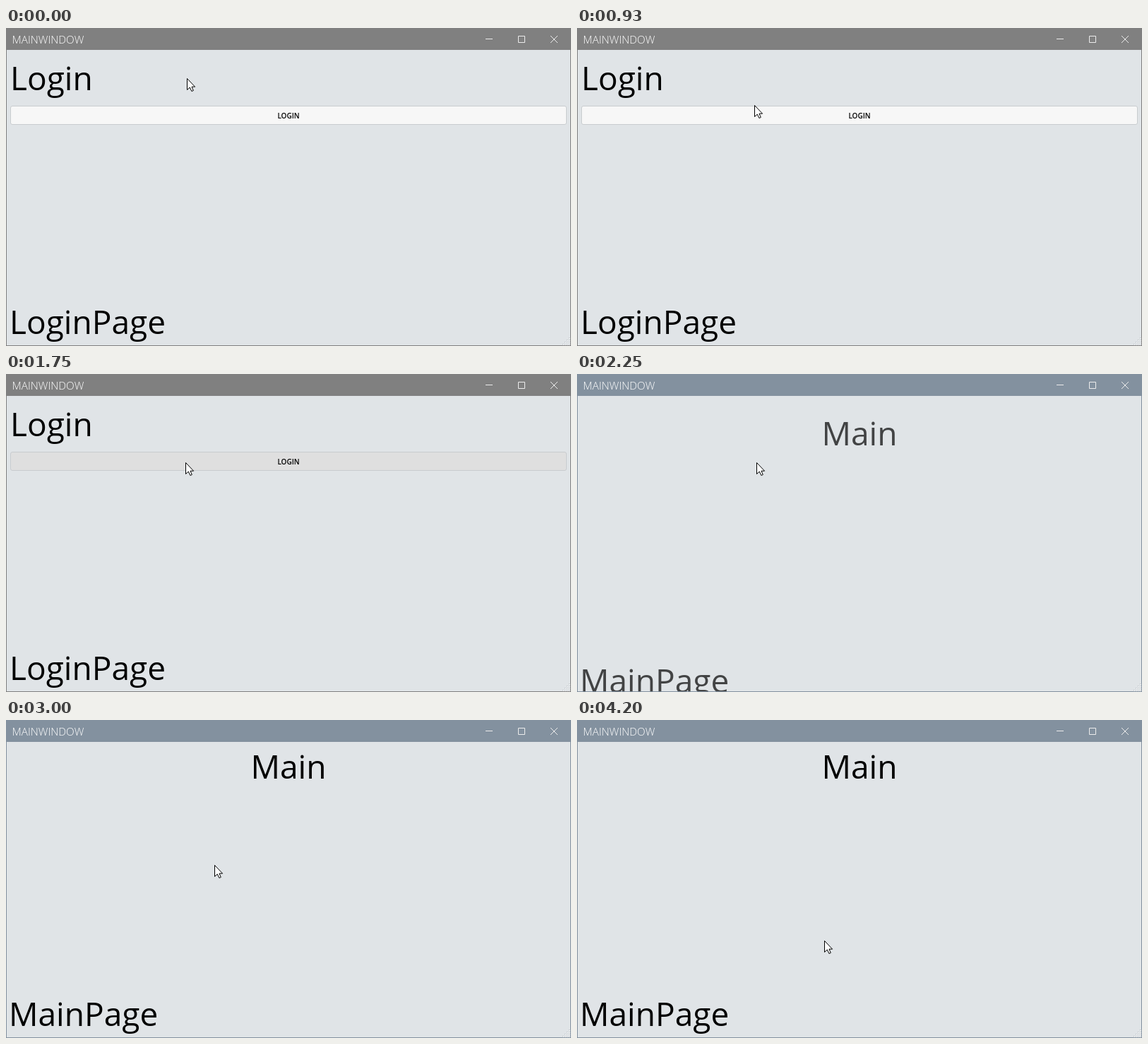
These frames come from a looping animation (800 by 450 pixels, 4.23 s). An HTML page:

```html
<!DOCTYPE html>
<html lang="en">
<head>
<meta charset="utf-8">
<title>Login window</title>
<style>
  html, body { margin: 0; width: 100%; height: 100%; overflow: hidden; background: #e0e4e7; }
  svg { display: block; width: 800px; height: 450px; font-family: "Open Sans", "Noto Sans", sans-serif; }
  .page { font-size: 46px; }
  .thin { fill: none; stroke: #ececec; }
</style>
</head>
<body>
<svg viewBox="0 0 800 450">
  <rect width="800" height="450" fill="#e0e4e7"/>
  <g id="login" class="page">
    <text x="6" y="88">Login</text>
    <rect id="button" x="6.5" y="110.5" width="787" height="26" rx="2.5" stroke="#c8cccf"/>
    <text x="400" y="128" font-size="10" font-weight="600" text-anchor="middle">LOGIN</text>
    <text x="5" y="433">LoginPage</text>
  </g>
  <g id="main" class="page">
    <text x="400" y="83" text-anchor="middle">Main</text>
    <text x="4" y="433">MainPage</text>
  </g>
  <g id="grip"></g>
  <g id="frame">
    <rect width="800" height="31"/>
    <path d="M0 31h1v418h798v-418h1v419H0z"/>
  </g>
  <text x="8.5" y="22" font-size="15.3" font-weight="300" fill="#fff">MAINWINDOW</text>
  <path class="thin" d="M679 15.5h10M725.5 11.5h9v9h-9zM771 11l10 10M781 11l-10 10"/>
  <path id="cursor" d="M.5 .5V16.5L4.3 13.1L6.9 18.5L9.3 17.5L7 12.2H11.6Z" fill="#fff" stroke="#000"/>
</svg>
<script>
const LOOP = 4230, ACTIVATE = 1900, SWITCH = 2040, SLIDE = 300;
const path = [  // time, x, y of the pointer tip
  [0, 256, 71], [150, 256, 71], [930, 251, 109], [1300, 254, 125],
  [2740, 254, 125], [3350, 350, 312], [LOOP, 350, 312]
];
const el = id => document.getElementById(id);
const [login, main, button, frame, cursor, grip] =
  ['login', 'main', 'button', 'frame', 'cursor', 'grip'].map(el);

let dots = '';
for (let i = 0; i < 4; i++)
  for (let j = 3 - i; j < 4; j++) {
    const x = 788 + 3 * i, y = 438 + 3 * j;
    dots += `<rect x="${x}" y="${y}" width="1" height="1"/>`;
  }
grip.innerHTML = `<g fill="#fff" transform="translate(1 1)">${dots}</g><g fill="#b8bcc0">${dots}</g>`;

const clamp = v => Math.max(0, Math.min(1, v));

function pointer(t) {
  const k = path.findIndex(p => p[0] > t);
  const [t0, x0, y0] = path[k - 1], [t1, x1, y1] = path[k];
  const p = (t - t0) / (t1 - t0);
  return [x0 + (x1 - x0) * p, y0 + (y1 - y0) * p].map(Math.round);
}

function draw(t) {
  const [x, y] = pointer(t);
  const shown = clamp((t - SWITCH) / SLIDE);
  const onLogin = t < SWITCH;
  cursor.setAttribute('transform', `translate(${x} ${y})`);
  button.setAttribute('fill', y >= 110 && y < 137 ? '#dfdfdf' : '#f7f7f7');
  frame.setAttribute('fill', t < ACTIVATE ? '#808080' : '#83919f');
  login.setAttribute('display', onLogin ? 'inline' : 'none');
  main.setAttribute('display', onLogin ? 'none' : 'inline');
  main.setAttribute('opacity', shown);
  main.setAttribute('transform', `translate(0 ${60 * (1 - shown)})`);
}

const start = performance.now();
function tick() {
  draw((performance.now() - start) % LOOP);
  requestAnimationFrame(tick);
}
tick();
</script>
</body>
</html>
```
